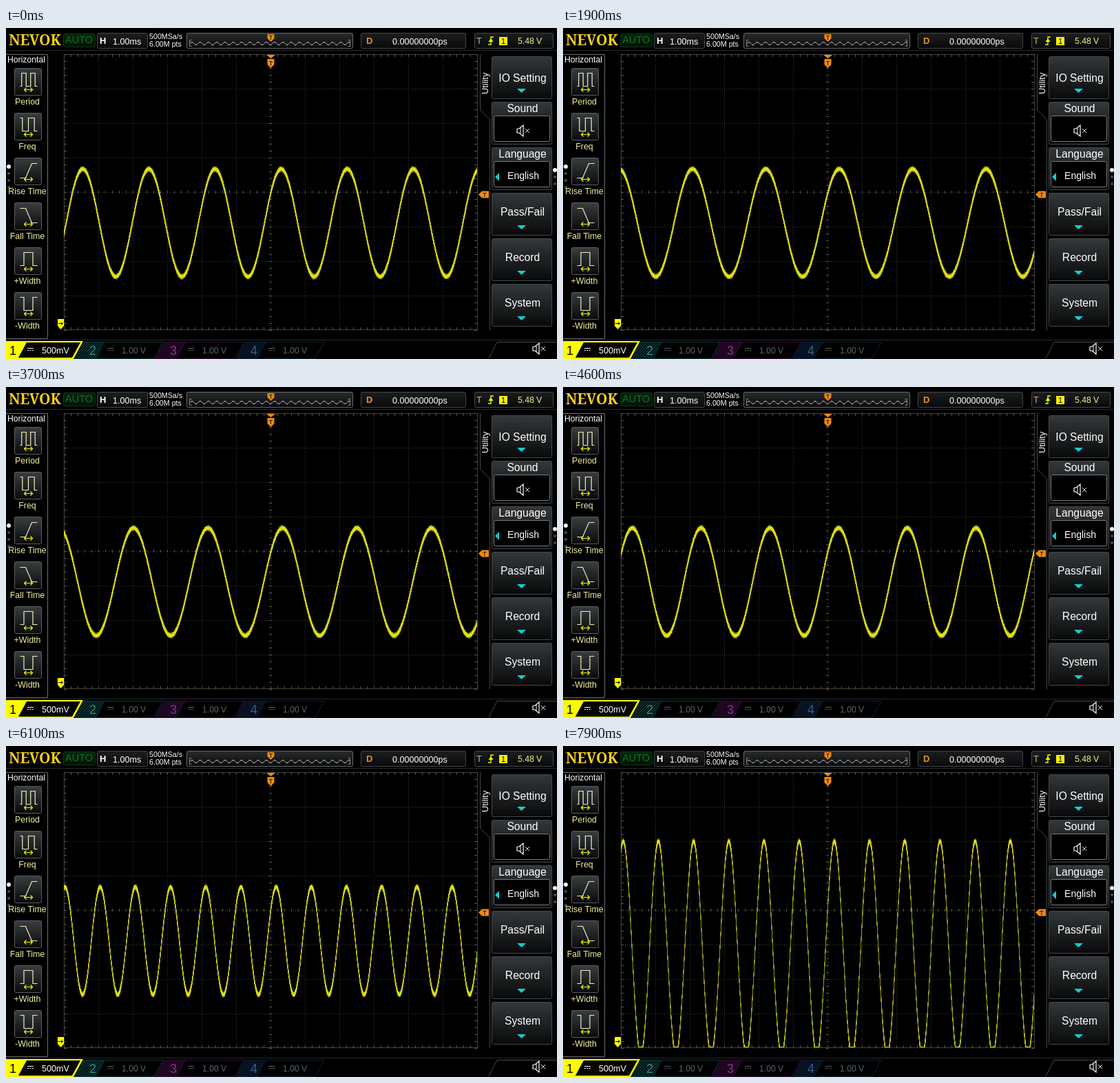
These frames come from a looping animation (800x480 px, 8000 ms). An HTML page with a canvas:

```html
<!DOCTYPE html>
<html lang="en">
<head>
<meta charset="utf-8">
<title>Oscilloscope</title>
<style>
html, body { margin: 0; width: 100%; height: 100%; overflow: hidden; background: #000; }
canvas { display: block; width: 800px; height: 480px; }
</style>
</head>
<body>
<canvas id="scope" width="800" height="480"></canvas>
<script>
const W = 800, H = 480, LOOP = 8000, STEP = 100;
const SANS = '"Liberation Sans", Arial, sans-serif';
const YELLOW = '#f4f400', ORANGE = '#f08a10', CYAN = '#10d0d0', CREAM = '#f0f0c0';
const EDGE = '#45484a', DARK = '#08090a', LIT = '#34383a';
const GRID = { x: 84, y: 38, w: 600, h: 400, cell: 50 };

const view = document.getElementById('scope').getContext('2d');
const panel = document.createElement('canvas');
panel.width = W;
panel.height = H;
const g = panel.getContext('2d');

function text(str, x, y, size, color = '#fff', align = 'left', weight = '') {
  g.font = `${weight} ${size}px ${SANS}`;
  g.fillStyle = color;
  g.textAlign = align;
  g.fillText(str, x, y);
}

function rect(x, y, w, h, color) {
  g.fillStyle = color;
  g.fillRect(x, y, w, h);
}

function trace(points) {
  g.beginPath();
  for (let i = 0; i < points.length; i += 2) g.lineTo(points[i], points[i + 1]);
}

function poly(color, ...points) {
  trace(points);
  g.closePath();
  g.fillStyle = color;
  g.fill();
}

function line(color, width, ...points) {
  trace(points);
  g.strokeStyle = color;
  g.lineWidth = width;
  g.stroke();
}

function box(x, y, w, h, top = LIT, bottom = DARK, edge = EDGE) {
  const fill = g.createLinearGradient(0, y, 0, y + h);
  fill.addColorStop(0, top);
  fill.addColorStop(1, bottom);
  g.beginPath();
  g.roundRect(x + .5, y + .5, w - 1, h - 1, 2);
  g.fillStyle = fill;
  g.fill();
  g.strokeStyle = edge;
  g.lineWidth = 1;
  g.stroke();
}

function dots(x, y, count) {
  for (let i = 0; i < count; i++) {
    g.beginPath();
    g.arc(x, y + i * 10, i ? 2 : 3, 0, 7);
    g.fillStyle = i ? '#4c4c4c' : '#f4f4f4';
    g.fill();
  }
}

// Pennant with a letter; the tip lies at the local origin and points down before turning.
function tag(x, y, angle, size) {
  g.save();
  g.translate(x, y);
  g.rotate(angle);
  poly(ORANGE, 0, 0, -5, -5, -5, -size, 5, -size, 5, -5);
  g.translate(0, -size / 2 - 1.5);
  g.rotate(-angle);
  text('T', 0, 3.5, 9.5, '#000', 'center');
  g.restore();
}

function speaker(x, y) {
  line('#fff', 1.2, x, y - 3, x + 3, y - 3, x + 9, y - 8, x + 9, y + 8, x + 3, y + 3, x, y + 3, x, y - 3);
  line('#fff', 1, x + 5, y - 4, x + 5, y + 4);
  for (const d of [-3, 3]) line('#ddd', 1, x + 12, y - d, x + 18, y + d);
}

function arrow(x, y, reach) {
  line(YELLOW, 1, x - reach, y, x + reach, y);
  for (const d of [-1, 1]) {
    const tip = x + d * reach;
    line(YELLOW, 1.2, tip - d * 3, y - 3, tip, y, tip - d * 3, y + 3);
  }
}

function drawHeader() {
  line('#26282a', 1, 0, 32.5, W, 32.5);
  g.font = 'bold 21px "Noto Serif", serif';
  g.fillStyle = '#f8d018';
  g.fillText('NEVOK', 4, 25);

  box(83, 8, 47, 20, '#06260c', '#031006', '#0c3a14');
  text('AUTO', 86, 22, 14.5, '#0c7428');
  box(132, 7, 74, 23, '#1c1e20');
  text('H', 136, 23, 13, '#fff', 'left', 'bold');
  text('1.00ms', 155, 24, 12.6);
  text('500MSa/s', 208, 16, 10.7);
  text('6.00M pts', 208, 27, 10.7);

  box(262, 7, 242, 23, '#2a2c2e', DARK, '#66686a');
  const ripple = [];
  for (let x = 267; x < 500; x++) ripple.push(x, 22.5 - 2 * Math.sin((x - 267) * Math.PI / 6));
  line('#c8c8c8', 1, ...ripple);
  for (const [x, d] of [[266.5, 3], [499.5, -3]]) line('#88888a', 1, x + d, 17.5, x, 17.5, x, 26.5, x + d, 26.5);
  tag(384.5, 20, 0, 11);

  box(515, 7, 153, 23, '#1c1e20');
  text('D', 523, 23, 13, '#f0901c', 'left', 'bold');
  text('0.00000000ps', 561, 24, 12.6);
  box(680, 7, 115, 23, '#1c1e20');
  text('T', 683, 23, 13, '#c8b470');
  line(YELLOW, 1.4, 700, 24, 704, 24, 704, 13, 708, 13);
  poly(YELLOW, 700.5, 20, 704, 15, 707.5, 20);
  rect(716, 13, 12, 12, '#f8f000');
  text('1', 722, 23, 11, '#000', 'center');
  text('5.48 V', 743, 23, 12.2, '#f4f480');
}

// Square wave with evenly spread edges, in a 40 px button.
function pulses(edges, high) {
  const gap = 26 / edges, path = [8, high ? 7 : 26];
  for (let i = 0; i < edges; i++) {
    const x = 20 + (i - (edges - 1) / 2) * gap, y = path[path.length - 1];
    path.push(x, y, x, 33 - y);
  }
  path.push(33, path[path.length - 1]);
  line(CREAM, 1.2, ...path);
}

function ramp(from, to) {
  line(CREAM, 1.2, 8, from, 16, from, 25, to, 33, to);
}

function drawMeasures() {
  const icons = {
    'Period': () => pulses(4, false),
    'Freq': () => pulses(3, true),
    'Rise Time': () => ramp(29, 8),
    'Fall Time': () => ramp(8, 29),
    '+Width': () => pulses(2, false),
    '-Width': () => pulses(2, true)
  };
  line('#6c6e70', 1, 0, 38.5, 60.5, 38.5, 60.5, 450.5, 0, 450.5);
  text('Horizontal', 2, 50, 12.2);
  dots(4, 201, 4);
  Object.entries(icons).forEach(([label, draw], i) => {
    const y = 58 + i * 65;
    box(12, y, 40, 40, '#3a3e40', DARK, '#5c6062');
    g.save();
    g.translate(12.5, y + .5);
    draw();
    arrow(20, 31, 6);
    g.restore();
    text(label, 31, y + 53, 12.4, '#f0f0a0', 'center');
  });
}

function drawGrid() {
  const { x, y, w, h, cell } = GRID, r = x + w, b = y + h, cx = x + w / 2, cy = y + h / 2;
  const dim = '#38382c', tick = '#58584a';
  g.setLineDash([1, 2]);
  for (let px = x + cell; px < r; px += cell) line(dim, 1, px + .5, y, px + .5, b);
  for (let py = y + cell; py < b; py += cell) line(dim, 1, x, py + .5, r, py + .5);
  g.setLineDash([]);
  g.strokeStyle = '#40403a';
  g.lineWidth = 1;
  g.strokeRect(x + .5, y + .5, w, h - 1);
  for (let px = x; px <= r; px += 10) for (const py of [y, cy - 2, b - 4]) rect(px, py, 1, 4, tick);
  for (let py = y; py <= b; py += 10) for (const px of [x, cx - 2, r - 4]) rect(px, py, 4, 1, tick);
}

function drawMenu() {
  line(EDGE, 1, 688.5, 38, 688.5, 119, 702.5, 133, 702.5, 438);
  g.save();
  g.translate(700, 96);
  g.rotate(-Math.PI / 2);
  text('Utility', 0, 0, 12.8);
  g.restore();

  ['IO Setting', 'Sound', 'Language', 'Pass/Fail', 'Record', 'System'].forEach((label, i) => {
    const y = 41 + i * 66, hasValue = i === 1 || i === 2;
    box(705, y, 88, 62);
    text(label, 750, y + (hasValue ? 15 : i ? 33 : 37), 15.6, '#fff', 'center');
    if (hasValue) box(708, y + 20, 82, 38, '#000', '#000', '#77797b');
    else poly(CYAN, 742, y + 47, 755, y + 47, 748.5, y + 53);
  });
  speaker(742, 149);
  text('English', 751, 219, 14, '#fff', 'center');
  poly(CYAN, 716, 210, 716, 222, 710, 216);
  dots(797, 206, 3);
}

function coupling(x, color) {
  line(color, 1, x, 464.5, x + 9, 464.5);
  g.setLineDash([2, 1.5]);
  line(color, 1, x, 467.5, x + 9, 467.5);
  g.setLineDash([]);
}

function drawChannels() {
  line('#26282a', 1, 0, 452.5, W, 452.5);
  [180, 295, 212].forEach((hue, i) => {
    const x = 112 + i * 117, dark = `hsl(${hue} 65% 14%)`;
    g.save();
    trace([x, 455, x + 32, 455, x + 20, 479, x - 12, 479]);
    g.closePath();
    g.clip();
    for (let d = -12; d < 60; d += 4) line(dark, 1.6, x + d, 455, x + d - 24, 479);
    g.restore();
    line(dark, 1, x, 455.5, x + 116, 455.5, x + 103, 479.5, x - 12, 479.5);
    text(i + 2, x + 9, 474, 18, `hsl(${hue} 42% 38%)`);
    coupling(x + 35, '#606264');
    text('1.00 V', x + 56, 472, 12.2, '#606264');
  });
  poly('#fcfc00', 0, 454, 112, 454, 98, 480, 0, 480);
  poly('#040404', 30, 456, 108, 456, 96, 478, 18, 478);
  text('1', 5, 474, 18, '#000');
  coupling(31, '#fff');
  text('500mV', 52, 472, 12.6);
  line(EDGE, 1, 701, 479, 713, 455.5, W, 455.5);
  speaker(765, 465);
}

function drawMarkers() {
  poly(ORANGE, 378, 39, 391, 39, 384.5, 44);
  tag(384.5, 58, 0, 13);
  tag(686, 241.5, Math.PI / 2, 15);
  poly('#fcfc00', 75, 422, 84, 422, 84, 432, 79.5, 437, 75, 432);
  line('#000', 1, 76, 428.5, 82, 428.5);
  line('#000', 1, 80, 426.5, 82.5, 428.5, 80, 430.5);
}

// Signal frequency in Hz as the knob is turned: [ms, Hz].
const SWEEP = [[0, 520.8], [900, 519.6], [2800, 423.7], [4600, 501], [5500, 692.5], [6100, 978.5]];
const TRIGGER = { x: 384, y: 241 };

function progress(t, from, to) {
  return Math.min(1, Math.max(0, (t - from) / (to - from)));
}

function frequency(t) {
  let hz = SWEEP[0][1];
  for (let i = 1; i < SWEEP.length; i++) {
    const [t0, a] = SWEEP[i - 1], [t1, b] = SWEEP[i];
    hz += (b - a) * progress(t, t0, t1);
  }
  return hz;
}

function noise(x, seed) {
  const n = Math.sin(x * 12.9898 + seed * 78.233) * 43758.5453;
  return n - Math.floor(n);
}

function drawWave(t) {
  const gain = progress(t, 6900, 7500);
  const amp = 78 + 77 * gain, mid = 282.5 + 10.5 * gain;
  const omega = 2 * Math.PI * frequency(t) / (GRID.cell * 1000);
  const phase = Math.asin((mid - TRIGGER.y) / amp);
  const curve = x => mid - amp * Math.sin(omega * (x - TRIGGER.x) + phase);
  const floor = GRID.y + GRID.h - 1;

  function column(x, lo, hi, color) {
    const top = Math.round(Math.min(floor - 1, lo)), end = Math.round(Math.min(floor, hi));
    view.fillStyle = color;
    view.fillRect(x, top, 1, Math.max(1, end - top));
  }

  for (let x = GRID.x; x < GRID.x + GRID.w; x++) {
    const a = curve(x), b = curve(x + 1);
    const lo = Math.min(a, b), hi = Math.max(a, b);
    const level = 226 - 80 * Math.min(1, (hi - lo) / 18);
    const fringe = 3.4 + 1.2 * noise(x, t / STEP);
    column(x, lo - fringe, hi + fringe, `rgba(${level},${level},25,.5)`);
    column(x, lo - 2.4, hi + 2.4, `rgb(${level},${level},25)`);
  }
}

function frame() {
  const t = Math.floor(performance.now() % LOOP / STEP) * STEP;
  view.drawImage(panel, 0, 0);
  drawWave(t);
  requestAnimationFrame(frame);
}

rect(0, 0, W, H, '#000');
drawHeader();
drawMeasures();
drawGrid();
drawMenu();
drawChannels();
drawMarkers();
frame();
</script>
</body>
</html>
```
